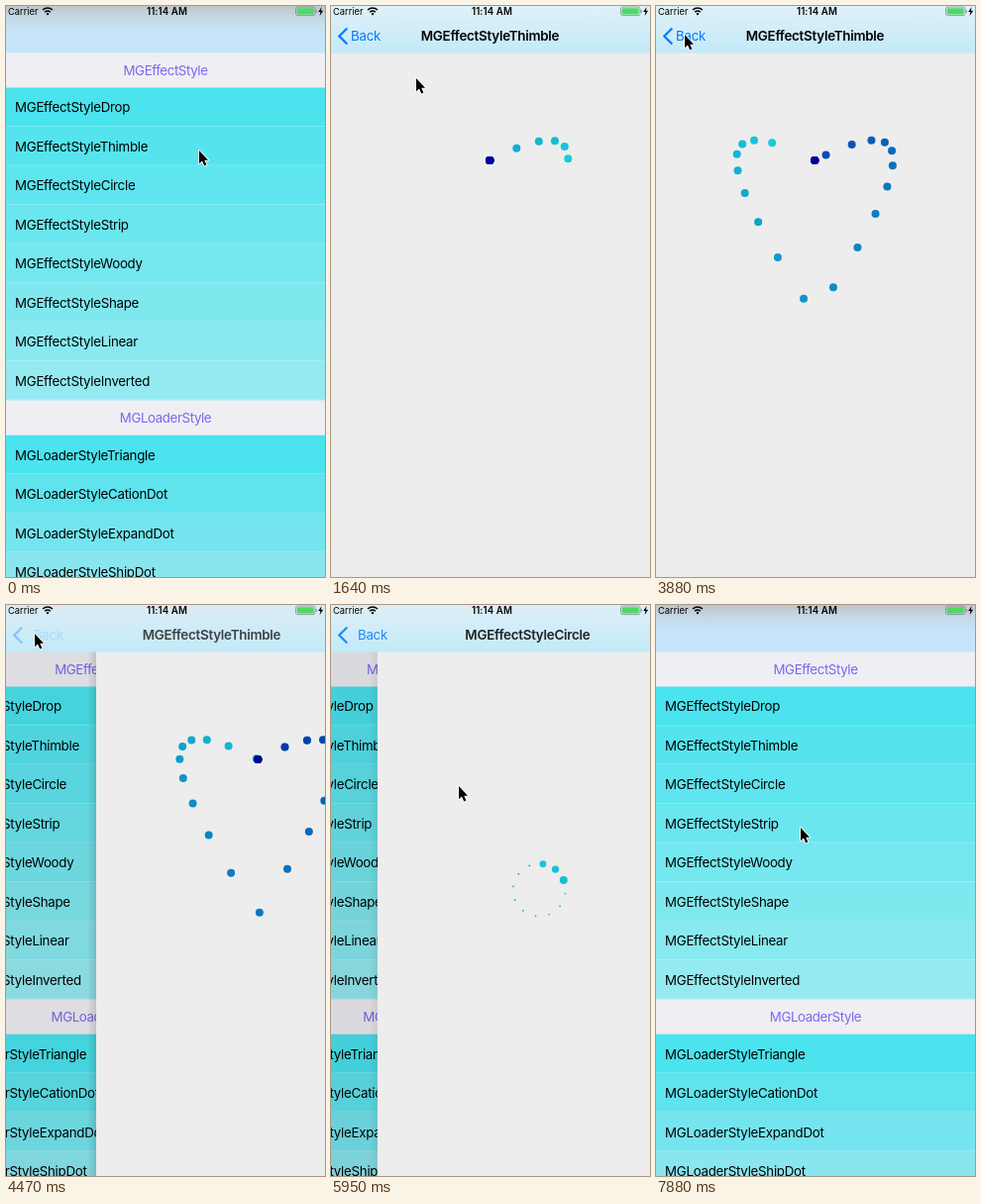
An HTML page with a canvas that plays this animation: 322 px wide and 577 px high, repeating every 8 s.

```html
<!DOCTYPE html>
<html lang="en">
<head>
<meta charset="utf-8">
<title>Loader list</title>
<style>
html, body { margin: 0; width: 100%; height: 100%; overflow: hidden; background: #ededed; }
canvas { display: block; }
</style>
</head>
<body>
<canvas id="stage" width="322" height="577"></canvas>
<script>
const W = 322, H = 577, BAR = 47.3, ROW = 39.5, HEADER = 35.2;
const LOOP = 8000, START = 890, TICK = 148.7;
const TAU = Math.PI * 2;
const ctx = document.getElementById('stage').getContext('2d');

const sections = [
  { name: 'MGEffectStyle', fade: 10.5,
    rows: ['Drop', 'Thimble', 'Circle', 'Strip', 'Woody', 'Shape', 'Linear', 'Inverted'] },
  { name: 'MGLoaderStyle', fade: 21,
    rows: ['Triangle', 'CationDot', 'ExpandDot', 'ShipDot'] }
];

// Each visit to a detail page, in ticks.
const visits = [
  { push: 0, pop: 24, title: 'MGEffectStyleThimble', draw: drawHeart },
  { push: 33, pop: 43, title: 'MGEffectStyleCircle', draw: drawCircle }
];

// Pointer way-points: tick, x, y.
const pointerPath = [
  [1, 195, 146], [5, 86, 73], [9, 29, 29], [25, 29, 29], [29, 120, 196],
  [30, 129, 183], [35, 129, 183], [40, 30, 28], [43, 30, 28], [47, 146, 225]
];

const clamp = v => Math.max(0, Math.min(1, v));

// Critically damped spring, sampled a little after its start.
function spring(ticks) {
  if (ticks < 0) return 0;
  const x = 1.05 + 2.36 * ticks;
  const p = 1 - (1 + x) * Math.exp(-x);
  return p > 0.998 ? 1 : p;
}

function rect(x, y, w, h, fill) {
  ctx.fillStyle = fill;
  ctx.fillRect(x, y, w, h);
}

function dot(x, y, r, fill) {
  ctx.fillStyle = fill;
  ctx.beginPath();
  ctx.arc(x, y, r, 0, TAU);
  ctx.fill();
}

function trace(points) {
  ctx.beginPath();
  points.forEach(([x, y]) => ctx.lineTo(x, y));
}

function text(str, x, y, { size = 13.3, weight = 400, color = '#000', align = 'left', spacing = -0.27 } = {}) {
  ctx.font = `${weight} ${size}px Inter, sans-serif`;
  ctx.letterSpacing = spacing + 'px';
  ctx.textAlign = align;
  ctx.fillStyle = color;
  ctx.fillText(str, x, y);
}

function verticalGradient(h, ...stops) {
  const g = ctx.createLinearGradient(0, 0, 0, h);
  stops.forEach(([at, color]) => g.addColorStop(at, color));
  return g;
}

function drawList(shown) {
  ctx.save();
  ctx.translate(-0.3 * W * shown, 0);
  let y = BAR;
  for (const { name, fade, rows } of sections) {
    rect(0, y, W, HEADER + 1, '#eeeef3');
    text(name, W / 2, y + 22.7, { color: '#7b68ee', align: 'center', spacing: -0.4 });
    y += HEADER;
    rows.forEach((row, i) => {
      rect(0, y, W, ROW + 0.5, `rgb(${74 + fade * i}, ${227 + i}, ${238 + i / 4})`);
      rect(0, y + ROW - 1, W, 1, 'rgba(255,255,255,.25)');
      text(name + row, 9, y + 24.9);
      y += ROW;
    });
  }
  ctx.restore();
  rect(0, 0, W, H, `rgba(0,0,0,${0.1 * shown})`);
}

// Dots chase each other along two mirrored quadratic curves.
function drawHeart(k) {
  const lead = 1.3 + 0.0895 * (k - 14);
  const count = 30;
  for (let i = 0; i < count; i++) {
    const u = Math.max(0, lead - i * 0.1) % 2;
    const t = u > 1 ? 2 - u : u;
    const side = u > 1 ? -1 : 1;
    const f = 1 - i / (count - 1);
    dot(160.3 + side * 316 * t * (1 - t), 156 - 161 * t + 318 * t * t, 4,
      `rgb(${22 * f}, ${203 * f}, ${150 + 70 * f})`);
  }
}

// Twelve dots shrink in turn around a ring.
function drawCircle(k) {
  const head = 2.1 + 1.75 * (k - 34);
  for (let i = 0; i < 12; i++) {
    const age = head - i;
    const scale = age < 0 ? 0.22 : 1 - 0.8 * (age % 12) / 12;
    const a = (i * 30 - 82) / 360 * TAU;
    dot(160.3 + 26.5 * Math.cos(a), 288 + 26.5 * Math.sin(a), 4 * scale,
      `rgb(${24 - i}, ${196 - 2.5 * i}, ${218 - 3.6 * i})`);
  }
}

function drawPage(visit, k, shown) {
  const x = W * (1 - shown);
  const shadow = ctx.createLinearGradient(x - 9, 0, x, 0);
  shadow.addColorStop(0, 'rgba(0,0,0,0)');
  shadow.addColorStop(1, `rgba(0,0,0,${0.45 * Math.min(0.3, x / W)})`);
  rect(x - 9, BAR, 9, H, shadow);
  rect(x, 0, W, H, '#ededed');
  ctx.save();
  ctx.translate(x > 1 ? x + 3 : x, 0);
  visit.draw(k);
  ctx.restore();
}

function drawBar(visit, k, shown) {
  rect(0, 0, W, BAR, verticalGradient(BAR,
    [0, '#bfc5ca'], [0.25, '#c5d8e6'], [0.5, '#c7e2f6'], [1, '#c5e5fb']));
  if (!visit) return;
  ctx.globalAlpha = Math.sqrt(shown);
  rect(0, 0, W, BAR, verticalGradient(BAR, [0, '#e0f1fa'], [0.5, '#d2edf8'], [1, '#c2eaf8']));

  const leaving = k >= visit.pop, rest = 1 - shown;
  const pressed = k >= visit.pop - 1;
  ctx.globalAlpha = shown;
  text(visit.title, 160.5 + rest * (leaving ? 166 : 260), 35,
    { size: 13.4, weight: 600, align: 'center' });

  ctx.globalAlpha = shown * (pressed ? (leaving ? 0.5 : 0.22) : 1);
  ctx.strokeStyle = '#007aff';
  ctx.lineWidth = 2.2;
  trace([[16.3, 22.5], [8.3, 30.5], [16.3, 38.5]]);
  ctx.stroke();
  ctx.globalAlpha = shown * (pressed ? 0.22 : 1);
  text('Back', 20 + rest * (leaving ? 28 : 48), 35, { color: '#007aff' });
  ctx.globalAlpha = 1;
}

function drawStatus() {
  text('Carrier', 2, 9, { size: 9.3, spacing: 0 });
  text('11:14 AM', 162.5, 9, { size: 9.7, weight: 600, align: 'center', spacing: 0.1 });

  ctx.strokeStyle = '#000';
  ctx.lineWidth = 1.5;
  for (const r of [4, 7]) {
    ctx.beginPath();
    ctx.arc(42, 9, r, -2.36, -0.78);
    ctx.stroke();
  }
  dot(42, 8, 1.2, '#000');

  ctx.lineWidth = 0.8;
  ctx.strokeStyle = '#7d8c90';
  ctx.beginPath();
  ctx.roundRect(292.5, 1, 19.5, 8.6, 2);
  ctx.stroke();
  ctx.fillStyle = '#4cd964';
  ctx.beginPath();
  ctx.roundRect(293.7, 2.2, 17, 6.2, 1);
  ctx.fill();
  rect(312.7, 4, 1, 2.8, '#7d8c90');
  ctx.fillStyle = '#000';
  trace([[318.6, 1], [315.2, 6], [317.4, 6], [316.6, 10], [320.2, 4.7], [317.9, 4.7]]);
  ctx.fill();
}

function drawPointer(k) {
  let i = 1;
  while (i < pointerPath.length - 1 && pointerPath[i][0] < k) i++;
  const [k0, x0, y0] = pointerPath[i - 1], [k1, x1, y1] = pointerPath[i];
  const p = clamp((k - k0) / (k1 - k0));
  ctx.save();
  ctx.translate(x0 + (x1 - x0) * p, y0 + (y1 - y0) * p);
  ctx.scale(0.88, 0.88);
  trace([[0, 0], [0, 15], [3.4, 12], [6, 17.6], [8.4, 16.6], [6, 11], [10.3, 11]]);
  ctx.closePath();
  ctx.lineJoin = 'round';
  ctx.lineWidth = 2;
  ctx.strokeStyle = '#fff';
  ctx.stroke();
  ctx.fillStyle = '#000';
  ctx.fill();
  ctx.restore();
}

function render(time) {
  // The screen refreshes in coarse ticks.
  const k = Math.floor((time - START) / TICK);
  const visit = visits.find(v => k >= v.push && spring(k - v.pop) < 1);
  const shown = visit ? spring(k - visit.push) - spring(k - visit.pop) : 0;
  drawList(shown);
  if (visit) drawPage(visit, k, shown);
  drawBar(visit, k, shown);
  drawStatus();
  drawPointer(k);
}

function loop() {
  render(performance.now() % LOOP);
  requestAnimationFrame(loop);
}
loop();
</script>
</body>
</html>
```
